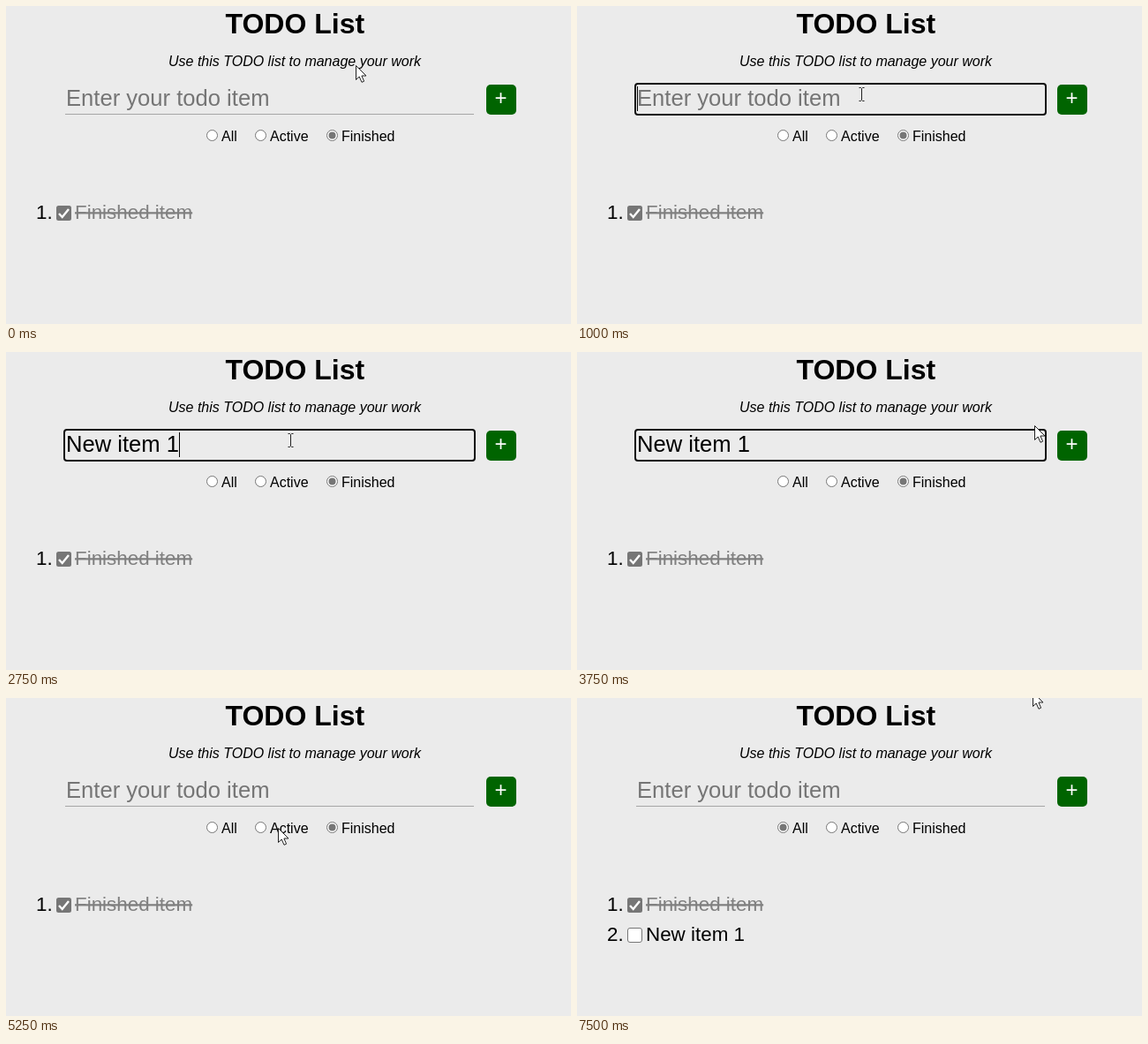
Recreate the animation shown at these times as an HTML page. Size 640x360 px, loop 7750 ms.

```html
<!DOCTYPE html>
<html lang="en">
<head>
<meta charset="utf-8">
<title>TODO List</title>
<style>
  html, body { margin: 0; width: 100%; height: 100%; overflow: hidden; background: #ebebeb; }
  svg { display: block; width: 640px; height: 360px; font: 16px "Liberation Sans", Arial, sans-serif; }
  .field { font-size: 25.6px; }
  .list { font-size: 22.4px; }
  .control { fill: #fff; stroke: #767676; }
  .hidden { visibility: hidden; }
</style>
</head>
<body>
<svg viewBox="0 0 640 360">
  <rect width="640" height="360" fill="#ebebeb"/>
  <text x="327.3" y="31" text-anchor="middle" font-size="32" font-weight="bold">TODO List</text>
  <text x="327" y="68" text-anchor="middle" font-style="italic">Use this TODO list to manage your work</text>

  <path id="underline" d="M67 122.5H530" stroke="#a6a6a6"/>
  <rect id="focus" x="66" y="88" width="465" height="35" rx="3" fill="none" stroke="#101010" stroke-width="2"/>
  <text id="placeholder" class="field" x="68" y="113" fill="#757575">Enter your todo item</text>
  <text id="value" class="field" x="68" y="113"></text>
  <path id="caret" d="M0 91V119" stroke="#000"/>

  <rect x="544" y="89" width="34" height="34" rx="5" fill="#006400"/>
  <text x="560.5" y="112" text-anchor="middle" font-size="24" fill="#fff">+</text>

  <g id="filters"></g>

  <g class="list">
    <text x="34" y="241">1.</text>
    <rect x="57" y="226" width="17" height="17" rx="2.5" fill="#767676"/>
    <path d="M60 235l3.7 4 7.3-9" fill="none" stroke="#fff" stroke-width="2.4"/>
    <text x="78" y="241" fill="#808080" text-decoration="line-through">Finished item</text>
    <g id="newItem">
      <text x="34" y="275">2.</text>
      <rect class="control" x="57.5" y="260.5" width="16" height="16" rx="2.5"/>
      <text x="78" y="275">New item 1</text>
    </g>
  </g>

  <circle id="ring" r="15" fill="none" stroke="#f5c898" stroke-width="3.5" opacity=".6"/>
  <g id="pointer">
    <path id="arrow" d="M.5.5V16.5L4.2 13 7 19.3 9.6 18.2 6.9 12H12Z" fill="#fff" stroke="#222"/>
    <path id="beam" d="M-3-7.5H-1L0-6.5 1-7.5H3M0-6.5V6.5M-3 7.5H-1L0 6.5 1 7.5H3" fill="none" stroke="#222"/>
  </g>
</svg>
<script>
const LOOP = 7750, STEP = 250;
const $ = id => document.getElementById(id);
const show = (id, visible) => $(id).classList.toggle("hidden", !visible);

// Pointer stops: [time, x, y]
const stops = [
  [0, 396, 67], [750, 322, 100], [3000, 322, 100], [3750, 518, 83],
  [4250, 556, 103], [4500, 556, 103], [5250, 308, 147], [5750, 233, 146],
  [6750, 233, 146], [7500, 516, -7]
];
// Text in the field: [time, number of characters]
const typing = [[0, 0], [1750, 1], [2000, 3], [2250, 6], [2500, 8], [2750, 10], [4500, 0]];
const clicks = [750, 4500, 6250];
const [focusTime, addTime, filterTime] = clicks;

const filters = [["All", 233.5, 244], ["Active", 288.5, 299], ["Finished", 369.5, 380]];
$("filters").innerHTML = filters.map(([label, cx, x]) => `
  <circle class="control" cx="${cx}" cy="146.5" r="6"/>
  <circle id="${label}" cx="${cx}" cy="146.5" r="4" fill="#767676"/>
  <text x="${x}" y="153">${label}</text>`).join("");

function pointerAt(t) {
  const next = stops.findIndex(stop => stop[0] > t);
  if (next < 0) return stops.at(-1).slice(1);
  const [t0, x0, y0] = stops[next - 1], [t1, x1, y1] = stops[next];
  const p = (t - t0) / (t1 - t0), eased = p * p * (3 - 2 * p);
  return [x0 + (x1 - x0) * eased, y0 + (y1 - y0) * eased].map(Math.round);
}

function caretVisible(t) {
  const lastReset = t < 1750 ? focusTime : t < 2750 ? t : 2800;
  return (t - lastReset) % 1000 < 500;
}

function draw(t) {
  const focused = t >= focusTime && t < addTime;
  const text = "New item 1".slice(0, typing.findLast(key => key[0] <= t)[1]);
  $("value").textContent = text;
  show("placeholder", !text);
  show("focus", focused);
  show("underline", !focused);
  show("caret", focused && caretVisible(t));
  const caretX = 68.5 + (text ? Math.floor($("value").getComputedTextLength()) : 0);
  $("caret").setAttribute("transform", `translate(${caretX})`);

  const showAll = t >= filterTime;
  show("All", showAll);
  show("Active", false);
  show("Finished", !showAll);
  show("newItem", showAll);

  const [x, y] = pointerAt(t);
  const overField = x > 66 && x < 531 && y > 87 && y < 124;
  $("pointer").setAttribute("transform", `translate(${x + (overField ? .5 : 0)} ${y})`);
  show("arrow", !overField);
  show("beam", overField);
  $("ring").setAttribute("transform", `translate(${x} ${y})`);
  show("ring", clicks.includes(t));
}

const start = performance.now();
function tick() {
  const t = (performance.now() - start) % LOOP;
  draw(Math.floor(t / STEP) * STEP);
  requestAnimationFrame(tick);
}
tick();
</script>
</body>
</html>
```
